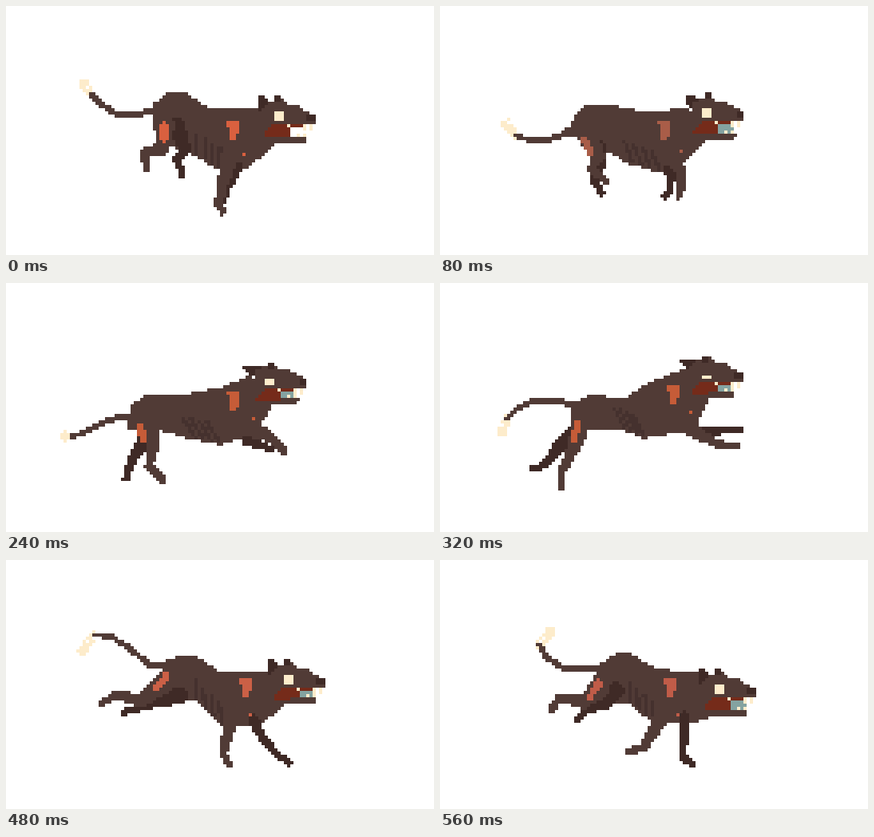
An HTML page with a canvas that plays this animation: 536x312 px, repeating every 0.64 s.

```html
<!DOCTYPE html>
<html lang="en">
<head>
<meta charset="utf-8">
<title>Running beast</title>
<style>
  html, body { margin: 0; width: 100%; height: 100%; overflow: hidden; background: #fff; }
  #stage { width: 536px; height: 312px; overflow: hidden; }
  canvas { display: block; width: 536px; height: 2496px; image-rendering: pixelated; animation: run 640ms steps(8) infinite; }
  @keyframes run { to { transform: translateY(-2496px); } }
</style>
</head>
<body>
<div id="stage"><canvas id="strip" width="134" height="624"></canvas></div>
<script>
const CELL = 4, COLS = 134, ROWS = 78;
const COAT = '#513b36', DARK = '#3f2a26', RIB = '#45312e', CREAM = '#fdeccb', RED = '#752b1a', TEAL = '#84a3a1';

// Joints are flat x,y lists: tail from tuft to rump, legs from hip to toe,
// back from rump to neck, belly from throat to groin.
const stretch = {
  head: [336, 132], ear: 1, eye: 12, jaw: 34, lean: 0, tongue: '#fff', sore: '#d9603f',
  tail: [98, 97, 106, 110, 118, 122, 138, 136, 168, 136, 184, 130],
  back: [180, 134, 186, 122, 202, 108, 224, 108, 254, 128, 320, 129],
  belly: [336, 174, 304, 203, 268, 206, 236, 188, 200, 172],
  nearHind: [198, 150, 196, 178, 173, 184, 176, 205], farHind: [214, 152, 224, 180, 214, 192, 221, 212],
  nearFore: [280, 190, 272, 220, 266, 247, 271, 258], farFore: [290, 200, 284, 216, 276, 230, 272, 244],
  hipSore: [198, 150, 198, 170], chestSore: [276, 144], spot: [296, 184]
};
const gather = {
  head: [324, 124], ear: 0, eye: 12, jaw: 32, lean: -18, tongue: TEAL, sore: '#a95d48',
  tail: [68, 198, 84, 214, 106, 213, 128, 202, 136, 188, 144, 178],
  back: [136, 188, 150, 154, 166, 138, 198, 138, 272, 139, 302, 124],
  belly: [326, 168, 306, 194, 280, 211, 238, 208, 204, 184],
  nearHind: [176, 180, 202, 198, 206, 224, 242, 237], farHind: [180, 204, 180, 216, 172, 244, 184, 257],
  nearFore: [300, 184, 330, 192, 340, 208, 326, 220], farFore: [284, 206, 294, 220, 300, 230, 290, 233],
  hipSore: [164, 187, 180, 198], chestSore: [272, 148], spot: [304, 176]
};
const leap = {
  head: [328, 108], ear: 0, eye: 4, jaw: 28, lean: -12, tongue: TEAL, sore: '#c65c38',
  tail: [78, 186, 84, 170, 98, 157, 116, 148, 152, 148, 168, 154],
  back: [164, 178, 166, 150, 188, 140, 232, 144, 262, 124, 312, 106],
  belly: [336, 148, 318, 184, 254, 195, 228, 184, 184, 186],
  nearHind: [178, 172, 168, 206, 152, 236, 152, 257], farHind: [172, 186, 148, 206, 132, 228, 116, 233],
  nearFore: [306, 178, 328, 192, 348, 202, 372, 205], farFore: [318, 187, 346, 187, 354, 183, 377, 185],
  hipSore: [172, 178, 168, 198], chestSore: [284, 128], spot: [312, 160]
};
const fly = {
  head: [352, 128], ear: 0, eye: 12, jaw: 32, lean: -4, tongue: '#fff', sore: '#b3634a',
  tail: [66, 140, 96, 126, 110, 120, 132, 120, 150, 130, 170, 143],
  back: [164, 168, 164, 142, 188, 128, 256, 135, 278, 128, 332, 126],
  belly: [336, 170, 320, 186, 286, 204, 248, 197, 226, 178],
  nearHind: [176, 162, 150, 176, 122, 194, 100, 208], farHind: [206, 172, 160, 176, 130, 180, 106, 183],
  nearFore: [312, 190, 316, 216, 332, 240, 348, 258], farFore: [320, 192, 332, 208, 348, 222, 372, 230],
  hipSore: [174, 150, 160, 164], chestSore: [300, 140], spot: [316, 176]
};
const land = {
  head: [348, 144], ear: 1, eye: 12, jaw: 28, lean: -3, tongue: TEAL, sore: '#cb6046',
  tail: [96, 114, 110, 94, 132, 96, 154, 110, 180, 132, 200, 132],
  back: [184, 164, 200, 126, 216, 120, 240, 121, 268, 140, 330, 140],
  belly: [348, 184, 318, 206, 270, 208, 236, 176, 200, 172],
  nearHind: [196, 156, 170, 176, 136, 169, 119, 181], farHind: [218, 170, 186, 178, 164, 186, 148, 191],
  nearFore: [284, 196, 278, 216, 272, 242, 280, 257], farFore: [310, 200, 322, 224, 340, 244, 355, 254],
  hipSore: [200, 147, 186, 162], chestSore: [292, 150], spot: [304, 192]
};
const brace = {
  head: [344, 156], ear: 1, eye: 12, jaw: 31, lean: -2, tongue: TEAL, sore: '#c05c48',
  tail: [138, 91, 124, 106, 134, 122, 154, 136, 180, 136, 200, 136],
  back: [190, 168, 196, 134, 222, 116, 238, 117, 270, 136, 326, 142],
  belly: [344, 194, 316, 206, 268, 206, 236, 180, 206, 176],
  nearHind: [198, 162, 180, 178, 150, 173, 139, 188], farHind: [220, 164, 206, 180, 184, 188, 171, 201],
  nearFore: [278, 196, 266, 218, 254, 236, 236, 240], farFore: [306, 196, 306, 222, 303, 246, 316, 257],
  hipSore: [198, 155, 186, 174], chestSore: [280, 148], spot: [296, 192]
};

// The pose halfway between two others.
function between(a, b) {
  const mid = {};
  for (const key in a) {
    if (Array.isArray(a[key])) mid[key] = a[key].map((v, i) => (v + b[key][i]) / 2);
    else mid[key] = typeof a[key] === 'number' ? (a[key] + b[key]) / 2 : b[key];
  }
  return mid;
}

const gallop = [stretch, between(stretch, gather), gather, between(gather, leap), leap, fly, land, brace];
const ctx = document.getElementById('strip').getContext('2d');
let grid;

function paint(inside, color, onCoat) {
  for (let i = 0; i < COLS * ROWS; i++) {
    const x = (i % COLS + 0.5) * CELL, y = (Math.floor(i / COLS) + 0.5) * CELL;
    if ((!onCoat || grid[i] === COAT) && inside(x, y)) grid[i] = color;
  }
}

function poly(p, color) {
  paint((x, y) => {
    let hit = false;
    for (let i = 0, j = p.length - 2; i < p.length; j = i, i += 2) {
      const [ax, ay, bx, by] = [p[i], p[i + 1], p[j], p[j + 1]];
      if (ay > y !== by > y && x < (bx - ax) * (y - ay) / (by - ay) + ax) hit = !hit;
    }
    return hit;
  }, color);
}

// A jointed stroke that narrows from one width to the other.
function limb(p, from, to, color, onCoat) {
  const joints = p.length / 2 - 1;
  paint((x, y) => {
    for (let n = 0; n < joints; n++) {
      const [ax, ay, bx, by] = p.slice(n * 2, n * 2 + 4), dx = bx - ax, dy = by - ay;
      const k = Math.max(0, Math.min(1, ((x - ax) * dx + (y - ay) * dy) / (dx * dx + dy * dy)));
      const width = to + (from - to) * (1 - (n + k) / joints) ** 2;
      if (Math.hypot(x - ax - k * dx, y - ay - k * dy) < width / 2) return true;
    }
    return false;
  }, color, onCoat);
}

function box(x, y, w, h, color) {
  poly([x, y, x + w, y, x + w, y + h, x, y + h], color);
}

const shift = (p, [x, y]) => p.map((v, i) => v + (i % 2 ? y : x));

function drawHead({ head, ear, eye, jaw, tongue }) {
  const part = (p, color) => poly(shift(p, head), color);
  const bit = (x, y, w, h, color) => box(head[0] + x, head[1] + y, w, h, color);
  part([-28 + 10 * ear, -10 - 9 * ear, -20 + 8 * ear, -14 - 4 * ear, -4, -11, -6, 0, -18, 0], DARK);
  part([-16, -4, -6, -11, 2, -14, 12, -14, 16, -8, 32, -6, 40, 0, 48, 3, 52, 7, 52, 16, 38, 17,
    38, jaw, 41, jaw, 38, jaw + 8, 6, jaw + 8, -12, 42], COAT);
  bit(2, -16 - 4 * ear, 8, 8, DARK);
  bit(42, 5, 10, 7, DARK);
  bit(0, 12 - eye, 12, eye, CREAM);
  part([-12, 32, -12, 27, -2, 17, 38, 16, 38, 20, 22, 20, 20, jaw, 0, 32], RED);
  bit(20, 20, 20, jaw - 20, tongue);
  for (const x of [16, 36, 44]) bit(x, 16, 4, x > 16 ? 8 : 4, CREAM);
  for (const x of [28, 36]) bit(x, jaw - 4, 4, 4, CREAM);
}

function drawTail(tail) {
  const ragged = (x, y) => Math.abs(Math.sin(x * 12.9 + y * 78.2) * 43758.5) % 1 < 0.85;
  const [ax, ay, bx, by] = tail;
  paint((x, y) => {
    const k = Math.max(0, Math.min(1, ((x - ax) * (bx - ax) + (y - ay) * (by - ay)) / Math.hypot(bx - ax, by - ay) ** 2));
    return Math.hypot(x - ax - k * (bx - ax), y - ay - k * (by - ay)) < 6.5 - 2 * k && ragged(x, y);
  }, CREAM);
  limb(tail.slice(2), 6, 8, COAT);
}

function drawRibs({ belly, lean }) {
  const [ax, ay, bx, by] = belly.slice(4, 8);
  for (let k = 0; k < 1; k += 0.3) {
    const x = ax + (bx - ax) * k, y = ay + (by - ay) * k;
    limb([x + lean, y - 28, x, y - 4], 5, 5, RIB, true);
  }
}

function drawPose(pose, index) {
  grid = new Array(COLS * ROWS);
  drawTail(pose.tail);
  poly([...pose.back, ...pose.belly], COAT);
  drawRibs(pose);
  limb(pose.farHind, 22, 9, DARK);
  limb(pose.farFore, 14, 9, DARK);
  limb(pose.nearHind, 26, 9, COAT);
  limb(pose.nearFore, 22, 9, COAT);
  drawHead(pose);
  limb(pose.hipSore, 11, 8, pose.sore);
  poly(shift([0, 0, 16, 0, 16, 12, 10, 24, 4, 24, 4, 12], pose.chestSore), pose.sore);
  box(...pose.spot, CELL, CELL, pose.sore);
  grid.forEach((color, i) => {
    ctx.fillStyle = color;
    ctx.fillRect(i % COLS, index * ROWS + Math.floor(i / COLS), 1, 1);
  });
}

gallop.forEach(drawPose);
</script>
</body>
</html>
```
